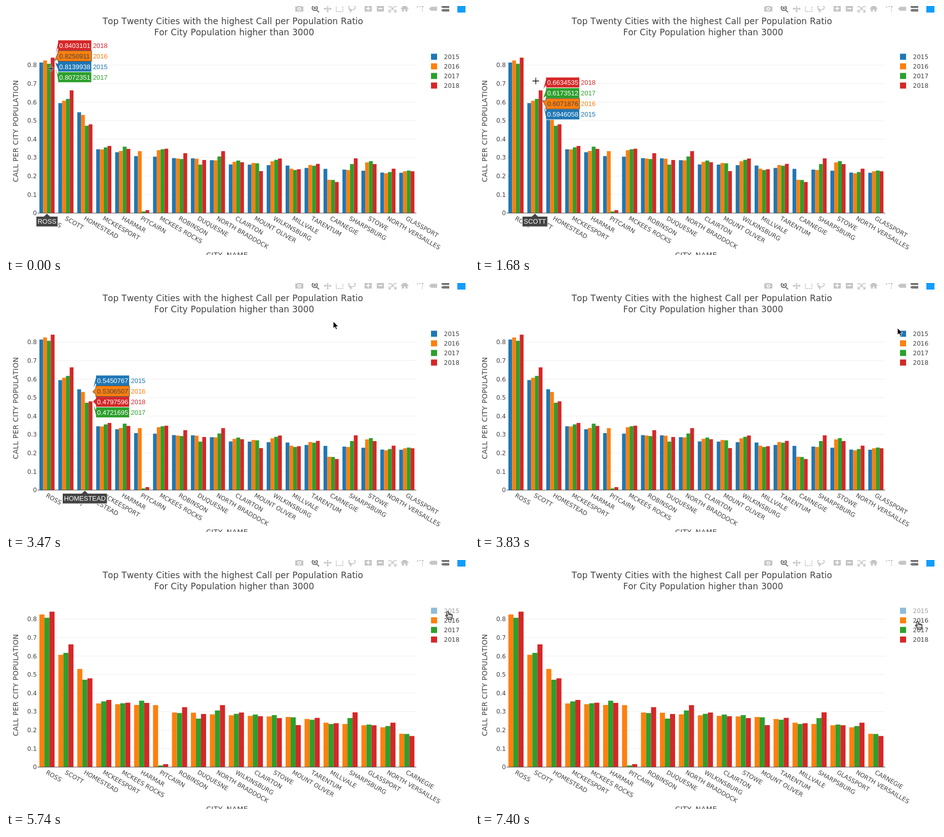
An HTML page that plays this animation: 914 px wide and 493 px high, repeating every 8 s.

```html
<!DOCTYPE html>
<html lang="en">
<head>
<meta charset="utf-8">
<title>Call per population ratio</title>
<style>
  html, body { margin: 0; width: 100%; height: 100%; overflow: hidden; background: #fff; }
  svg { display: block; width: 914px; height: 493px; }
  text { font: 12px "DejaVu Sans", sans-serif; font-kerning: none; word-spacing: .4px; fill: #444; }
  .title { font-size: 17px; text-anchor: middle; }
  .axis { font-size: 14px; text-anchor: middle; }
  .tip { font: 13px "Liberation Sans", sans-serif; }
</style>
</head>
<body>
<svg id="stage" viewBox="0 0 914 493"></svg>
<script>
const LOOP = 8000, TOGGLE = 5740;
const LEFT = 62.2, RIGHT = 810, BASE = 410, UNIT = 366.2, CAT = 37.39;
const YEARS = [2015, 2016, 2017, 2018];
const COLORS = ['#1f77b4', '#ff7f0e', '#2ca02c', '#d62728'];
const CITIES = [
  ['ROSS', .8139938, .8250911, .8072351, .8403101],
  ['SCOTT', .5946058, .6071876, .6173512, .6634535],
  ['HOMESTEAD', .5450767, .5306507, .4721695, .4797596],
  ['MCKEESPORT', .345, .344, .355, .363],
  ['HARMAR', .329, .336, .359, .347],
  ['PITCAIRN', .308, .335, .009, .016],
  ['MCKEES ROCKS', .305, .34, .345, .348],
  ['ROBINSON', .297, .295, .292, .324],
  ['DUQUESNE', .296, .294, .262, .287],
  ['NORTH BRADDOCK', .286, .285, .306, .335],
  ['CLAIRTON', .263, .277, .284, .275],
  ['MOUNT OLIVER', .262, .271, .269, .227],
  ['WILKINSBURG', .259, .28, .288, .295],
  ['MILLVALE', .257, .24, .233, .237],
  ['TARENTUM', .244, .26, .256, .266],
  ['CARNEGIE', .239, .18, .179, .168],
  ['SHARPSBURG', .235, .233, .265, .296],
  ['STOWE', .229, .274, .281, .265],
  ['NORTH VERSAILLES', .219, .215, .222, .24],
  ['GLASSPORT', .218, .226, .23, .226]
];

const stage = document.getElementById('stage');
const yOf = v => BASE - v * UNIT;

function add(parent, tag, attrs = {}, text) {
  const node = document.createElementNS('http://www.w3.org/2000/svg', tag);
  for (const k in attrs) node.setAttribute(k, attrs[k]);
  if (text !== undefined) node.textContent = text;
  return parent.appendChild(node);
}
const group = (parent = stage) => add(parent, 'g');
const path = (parent, d, attrs) => add(parent, 'path', { d, ...attrs });

// Hard steps: rows of [time, value] for one CSS property
function step(node, prop, rows) {
  const keys = rows.map(([t, v]) => ({ offset: t / LOOP, [prop]: v, easing: 'step-end' }));
  keys.push({ offset: 1, [prop]: rows[rows.length - 1][1] });
  node.animate(keys, { duration: LOOP, iterations: Infinity });
}
function showBetween(node, from, to) {
  const rows = from > 0 ? [[0, 0], [from, 1]] : [[0, 1]];
  if (to < LOOP) rows.push([to, 0]);
  step(node, 'opacity', rows);
}

function drawToolbar() {
  const g = group(), pale = '#c5c5c5', dark = '#777';
  const line = (d, c = pale, w = 1.8) => path(g, d, { fill: 'none', stroke: c, 'stroke-width': w });
  const fill = (d, c = pale) => path(g, d, { fill: c, 'fill-rule': 'evenodd' });
  fill('M571 1h4l1.500-2h5l1.500 2h4v10h-16zM579 2.200a3.600 3.600 0 1 0 .01 0zM579 4a1.800 1.800 0 1 1-.01 0z');
  line('M609.500-1a5 5 0 1 0 .01 0M613 8l5 4.500M607 4h5M609.500 1.500v5', dark, 2.2);
  line('M635-1v13M628.500 5.500h13');
  fill('M635-3l3 3.500h-6zM635 13l3-3.500h-6zM627 5.500l3.500-3v6zM643 5.500l-3.500-3v6z');
  add(g, 'rect', { x: 652, y: -1, width: 13, height: 12, fill: 'none', stroke: pale, 'stroke-width': 1.8, 'stroke-dasharray': '2.500 1.500' });
  line('M680 7c-6-2-4-8 3-8s9 6 3 8c-3 1-6 0-7-1s-2 3 1 3 1 3-1 3');
  fill('M708-1h14v12h-14zM714 1v3h-3v2h3v3h2v-3h3v-2h-3v-3z');
  fill('M732-1h14v12h-14zM735 4v2h8v-2z');
  line('M757-1l12 12M769-1l-12 12M756 3v-4h4M766-1h4v4M770 7v5h-4M760 12h-4v-5', pale, 1.6);
  fill('M787-3l8 8-1.200 1.200-1.300-1.200v6h-4v-4h-3v4h-4v-6l-1.300 1.200-1.200-1.200z');
  fill('M811 1h3v2h-3zM816 0h3v2h-3zM821 0h3v3h-3zM821 5h2v2h-2zM821 9h2v2h-2z');
  fill('M835 5.500l4-4h12v8h-12z');
  fill('M859 2l3-3h13v5h-13zM859 8.500l3-2.500h13v5h-13z', dark);
  add(g, 'rect', { x: 891, y: -3, width: 16, height: 16, fill: '#119dff' });
}

function drawFrame() {
  add(stage, 'text', { class: 'title', x: 447.8, y: 36 }, 'Top Twenty Cities with the highest Call per Population Ratio');
  add(stage, 'text', { class: 'title', x: 450.3, y: 58 }, 'For City Population higher than 3000');
  for (let i = 0; i <= 8; i++) {
    const y = yOf(i / 10);
    if (i) path(stage, `M${LEFT} ${y}H${RIGHT}`, { stroke: '#eee' });
    add(stage, 'text', { x: 61, y: y + 4.3, 'text-anchor': 'end' }, i / 10);
  }
  add(stage, 'text', { class: 'axis', transform: 'translate(24 247.700) rotate(-90)', 'letter-spacing': .2 }, 'CALL PER CITY POPULATION');
  add(stage, 'text', { class: 'axis', x: 436.5, y: 498.3, 'letter-spacing': .45 }, 'CITY_NAME');
}

// Grouped bars for the series from index `first` on
function drawBars(cities, first) {
  const g = group(), w = CAT * .8 / (4 - first);
  cities.forEach(([name, ...values], i) => {
    const x = LEFT + CAT * i;
    values.slice(first).forEach((v, k) => add(g, 'rect', {
      x: x + CAT * .1 + k * w, y: yOf(v), width: w, height: v * UNIT, fill: COLORS[first + k]
    }));
    add(g, 'text', { transform: `translate(${x + CAT / 2} 417.800) rotate(30)`, y: 6 }, name);
  });
  return g;
}

function drawLegend() {
  YEARS.forEach((year, i) => {
    const g = group(), y = 100.5 + 19 * i;
    add(g, 'rect', { x: 839, y: y - 6, width: 12, height: 12, fill: COLORS[i] });
    add(g, 'text', { x: 864.5, y: y + 4.5 }, year);
    if (!i) step(g, 'opacity', [[0, 1], [TOGGLE, .5]]);
  });
}

function drawHover(index) {
  const g = group(), [name, ...values] = CITIES[index];
  const x = LEFT + CAT * (index + .9) + .6, mid = LEFT + CAT * (index + .5);
  const mean = values.reduce((sum, v) => sum + yOf(v), 0) / 4 + .3;
  const order = [0, 1, 2, 3].sort((a, b) => values[b] - values[a]);
  const rows = order.map((s, k) => ({ s, cy: mean + (k - 1.5) * 21 }));
  rows.sort((a, b) => (a.s === 1) - (b.s === 1));
  for (const { s, cy } of rows) {
    const y = yOf(values[s]), ink = s === 1 ? '#444' : '#fff';
    add(g, 'rect', { x: x + 72.5, y: cy - 10.5, width: 35, height: 21, fill: '#fff' });
    path(g, `M${x} ${y}L${x + 6} ${cy + 6}v4.500h66.500v-21h-66.500v4.500Z`, { fill: COLORS[s], stroke: ink });
    add(g, 'text', { class: 'tip', x: x + 8.6, y: cy + 4.6, style: 'fill:' + ink }, values[s]);
    add(g, 'text', { class: 'tip', x: x + 75.2, y: cy + 4.6, style: 'fill:' + COLORS[s] }, YEARS[s]);
  }
  const box = path(g, '', { fill: '#444', stroke: '#fff' });
  const label = add(g, 'text', { class: 'tip', x: mid, y: 431.2, 'text-anchor': 'middle', style: 'fill:#fff' }, name);
  const half = label.getComputedTextLength() / 2 + 3;
  box.setAttribute('d', `M${mid} 410.500l6 6H${mid + half}v20.500H${mid - half}v-20.500H${mid - 6}Z`);
  return g;
}

function drawCursor() {
  const g = group();
  const cross = group(g), arrow = group(g), hand = group(g);
  const plus = 'M-6.500 0h13M0-6.500v13';
  path(cross, plus, { stroke: '#fff', 'stroke-width': 3 });
  path(cross, plus, { stroke: '#000', 'stroke-width': 1.3 });
  path(arrow, 'M0 0V14L3.200 11 5.400 16 7.800 15 5.600 10.200H10Z', { stroke: '#fff' });
  path(hand, 'M3.800 1c1-.9 2.500-.3 2.700 1l.6 3.800c.6-1 2.100-.8 2.300.3.7-.8 2.100-.5 2.300.6.9-.6 2.300 0 2.300 1.200v3.300l-1.300 3v2h-7l-.5-1.800-3.900-5c-.8-1.300.8-2.400 1.900-1.400l1.200 1.200-1.300-6.600c-.1-.6 0-1.200.7-1.600z',
    { fill: '#fff', stroke: '#000', 'stroke-width': 1.3 });
  path(hand, 'M7.200 6v2.500M9.500 6.500v2.200M11.800 7.200v2M6.800 11v3M8.900 11v3M11 11v3', { stroke: '#000', 'stroke-width': .9 });
  showBetween(cross, 0, 3470);
  showBetween(arrow, 3470, 4070);
  showBetween(hand, 4070, LOOP);
  const track = [
    [0, 89, 124], [120, 87, 121], [240, 85, 118],
    [1440, 93, 125], [1560, 108, 138], [1680, 120, 148.5], [1800, 123, 152],
    [2400, 130, 161], [2520, 150, 191], [2630, 166.5, 215.5], [2750, 168, 218],
    [3350, 400, 140], [3470, 646, 76], [3590, 760, 79], [3710, 808, 84],
    [3830, 834, 89], [3950, 848, 93], [4070, 851, 96],
    [4190, 856, 98], [4310, 862, 100], [4420, 866, 101], [4540, 867, 101.2],
    [6690, 867, 105], [6810, 867, 113], [6930, 868, 122], [7040, 868, 128],
    [7160, 868.5, 126], [7280, 868.5, 123], [7400, 868.5, 121]
  ];
  step(g, 'transform', track.map(([t, x, y]) => [t, `translate(${x}px, ${y}px)`]));
}

drawToolbar();
drawFrame();
showBetween(drawBars(CITIES, 0), 0, TOGGLE);
showBetween(drawBars([...CITIES].sort((a, b) => b[2] - a[2]), 1), TOGGLE, LOOP);
path(stage, `M${LEFT} ${BASE}H${RIGHT}`, { stroke: '#444' });
drawLegend();
[[0, 1560], [1560, 2520], [2520, 3590]].forEach(([from, to], i) => showBetween(drawHover(i), from, to));
drawCursor();
</script>
</body>
</html>
```
